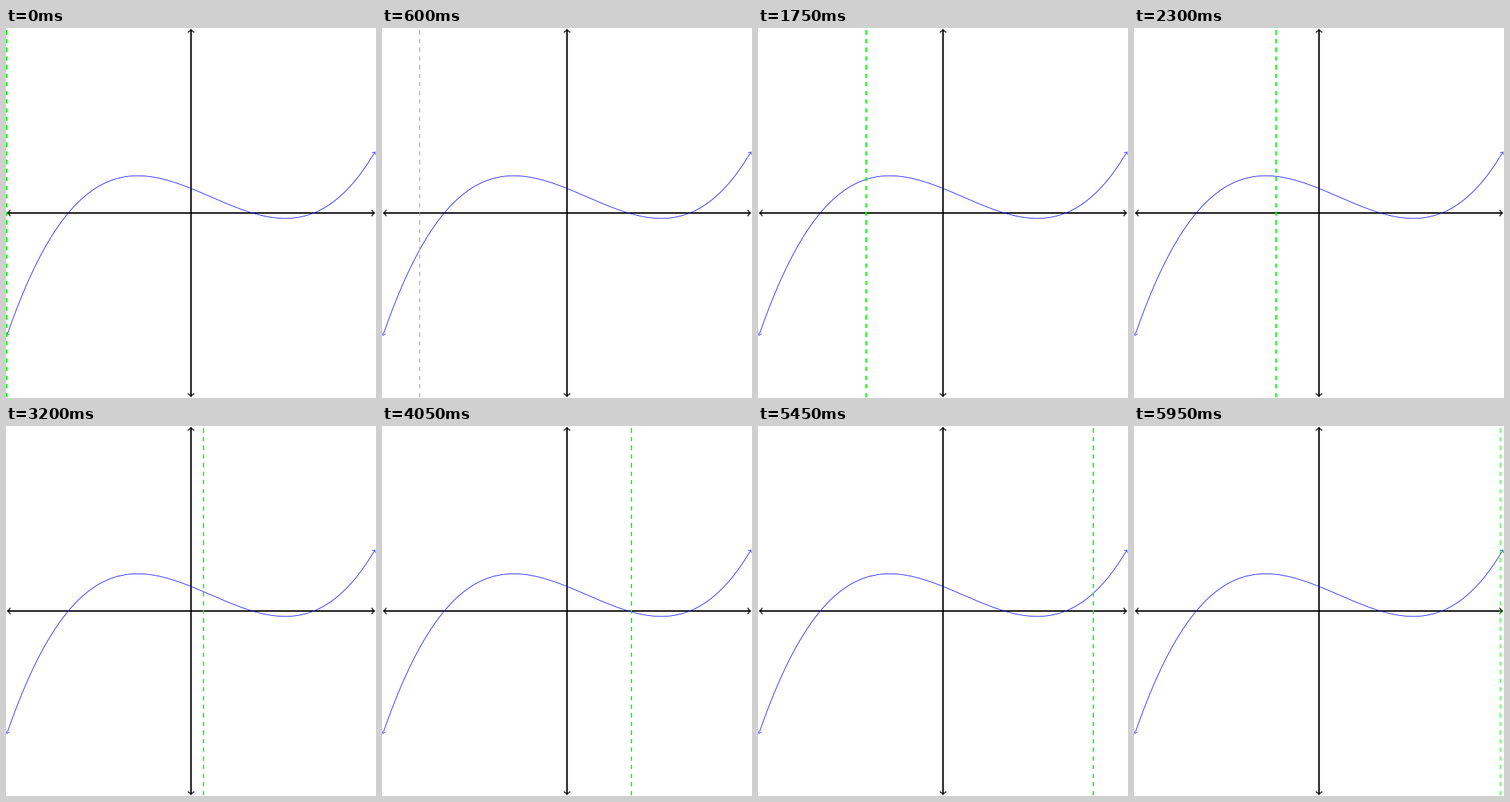
These frames come from a looping animation (534x534 px, 6 s). A matplotlib script:

```python
import numpy as np
import matplotlib.pyplot as plt
from matplotlib.animation import FuncAnimation
from matplotlib.collections import PolyCollection
from matplotlib.patches import PathPatch, Rectangle
from matplotlib.path import Path

SIZE, DPI = 534, 100
FRAMES, INTERVAL = 120, 50
PT = 150 / 72.27              # pixels per typographic point
SPAN = 9 / 2.54 * 150         # axis length in pixels
MID = SIZE / 2
UNIT = SPAN / 6
LO, HI = MID - SPAN / 2, MID + SPAN / 2
THIN, THICK = 0.4, 0.8

fig = plt.figure(figsize=(SIZE / DPI, SIZE / DPI), dpi=DPI, facecolor="white")
ax = fig.add_axes([0, 0, 1, 1])
ax.set_xlim(0, SIZE)
ax.set_ylim(SIZE, 0)
ax.axis("off")


def cubic(x):
    return 0.1 * (x + 2) * (x - 1) * (x - 2)


def slope(x):
    return 0.1 * (3 * x**2 - 2 * x - 4)


def stroke(path, width, color, z):
    ax.add_patch(PathPatch(path, fill=False, edgecolor=color,
                           linewidth=width * PT * 72 / DPI, zorder=z,
                           capstyle="round", joinstyle="round"))


def arrow(tip, heading, width, color, z):
    """Curved open arrowhead whose outer edge touches tip."""
    d = np.array(heading, float)
    d /= np.hypot(*d)
    normal = np.array([-d[1], d[0]])
    a = (0.28 + 0.3 * width) * PT
    base = np.array(tip) - d * (0.21 + 0.625 * width) * PT
    shape = [(-3, 4), (-2.75, 2.5), (0, 0.25), (0.75, 0),
             (0, -0.25), (-2.75, -2.5), (-3, -4)]
    pts = [base + a * (u * d + v * normal) for u, v in shape]
    stroke(Path(pts, [Path.MOVETO] + [Path.CURVE4] * 6), 0.8 * width, color, z)


# Coordinate axes
inset = (0.21 + 0.625 * THICK) * PT
start, length = LO + inset, SPAN - 2 * inset
for xy, w, h in [((start, MID - 1), length, 2), ((MID - 1, start), 2, length)]:
    ax.add_patch(Rectangle(xy, w, h, color="black", linewidth=0, zorder=1))
for tip, heading in [((LO, MID), (-1, 0)), ((HI, MID), (1, 0)),
                     ((MID, LO), (0, -1)), ((MID, HI), (0, 1))]:
    arrow(tip, heading, THICK, "black", 1)

# Cubic curve
x = np.linspace(-2.99, 2.99, 300)
stroke(Path(np.column_stack([MID + UNIT * x, MID - UNIT * cubic(x)])),
       THIN, "blue", 2)
for end, side in [(-3, -1), (3, 1)]:
    arrow((MID + UNIT * end, MID - UNIT * cubic(end)),
          (side, -side * slope(end)), THIN, "blue", 2)

# Sweeping dashed line, snapped to whole pixels
bottoms = HI - 6 * PT * np.arange(43)
dashes = [(round(b - 3 * PT), round(b)) for b in bottoms]
sweep = PolyCollection([], linewidths=0, antialiaseds=False, zorder=3)
ax.add_collection(sweep, autolim=False)


def update(i):
    center = LO + SPAN * i / FRAMES + 0.02
    left, right = (int(np.floor(center + s * THICK * PT / 2 + 0.5))
                   for s in (-1, 1))
    # a single-pixel line fades to grey, except at the arrow tips
    faded = right - left == 1 and right < HI - 12
    sweep.set_verts([[(left, t), (right, t), (right, b), (left, b)]
                     for t, b in dashes])
    sweep.set_facecolor("#999999" if faded else "#00ff00")
    return (sweep,)


anim = FuncAnimation(fig, update, frames=FRAMES, interval=INTERVAL,
                     init_func=lambda: update(0), repeat=True, repeat_delay=0)
plt.show()
```
